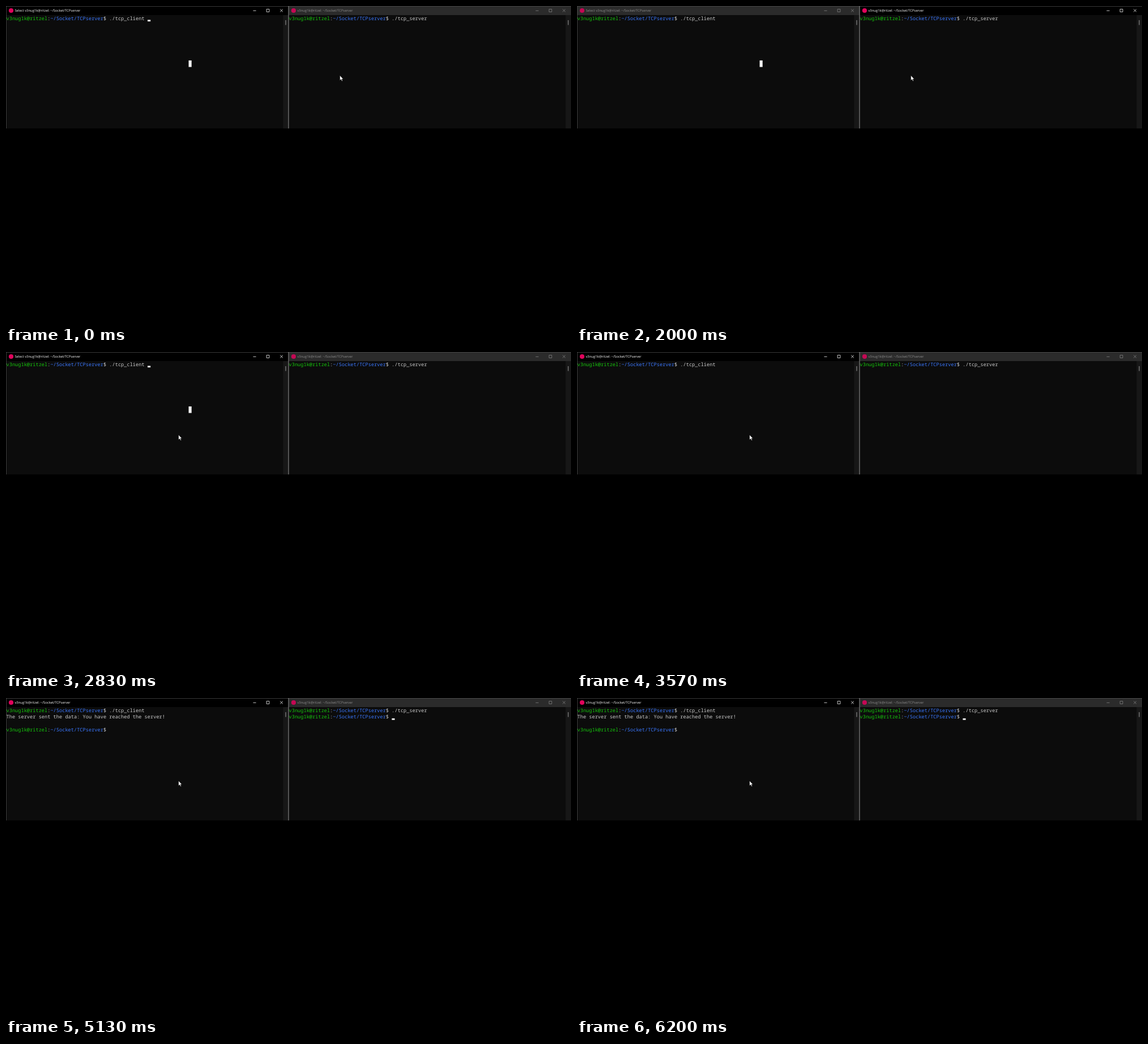
Write an HTML page that moves like this. It is 998x561 px and loops after 6460 ms.

```html
<!DOCTYPE html>
<html lang="en">
<head>
<meta charset="utf-8">
<title>TCP client and server</title>
<style>
  html, body { margin: 0; width: 100%; height: 100%; overflow: hidden; background: #000; }
  svg { display: block; }
  text { white-space: pre; text-rendering: geometricPrecision; }
  .term { font: 8.667px "Noto Sans Mono", "DejaVu Sans Mono", monospace; fill: #ccc; }
  .title { font: 5.9px "Open Sans", "Noto Sans", sans-serif; }
  .user { fill: #16c60c; }
  .path { fill: #3b78ff; }
</style>
</head>
<body>
<svg id="stage" width="998" height="561" viewBox="0 0 998 561"></svg>
<script>
const LOOP = 6460;
const COL = 5.2, ROW = 11.5;
const HOST = "v3nug1k@ritzel", DIR = "~/Socket/TCPserver";
const stage = document.getElementById("stage");

function add(parent, tag, attrs, text) {
  const el = document.createElementNS("http://www.w3.org/2000/svg", tag);
  for (const key in attrs) el.setAttribute(key, attrs[key]);
  if (text) el.textContent = text;
  parent.appendChild(el);
  return el;
}

const rect = (parent, x, y, width, height, fill) =>
  add(parent, "rect", { x, y, width, height, fill });

function line(parent, row, text) {
  return add(parent, "text", { class: "term", x: 0.5, y: 24.8 + row * ROW }, text);
}

function prompt(parent, row, command = "") {
  const el = line(parent, row);
  add(el, "tspan", { class: "user" }, HOST);
  add(el, "tspan", {}, ":");
  add(el, "tspan", { class: "path" }, DIR);
  add(el, "tspan", {}, "$ " + command);
  return el;
}

function makeWindow(x, command) {
  const g = add(stage, "g", { transform: `translate(${x} 0)` });
  rect(g, 0, 0, 499, 216, "#0c0c0c");
  rect(g, 489.5, 16, 9.5, 200, "#171717");
  rect(g, 493.6, 25, 1, 8.5, "#a0a0a0");
  const bar = rect(g, 0, 0, 499, 16, "#000");
  rect(g, 0, 0, 499, 0.8, "#484848");
  rect(g, 0, 0, 0.8, 216, "#484848");
  const icon = add(g, "circle", { cx: 9, cy: 8, r: 4.1 });
  const title = add(g, "text", { class: "title", x: 15.4, y: 10.2 });
  const buttons = add(g, "path", {
    d: "M436.5 8.3h5.2M460.2 5.6h4.8v4.8h-4.8zM484.2 5.6l4.8 4.8M489 5.6l-4.8 4.8",
    fill: "none", "stroke-width": 0.8
  });
  prompt(g, 0, command);
  const output = add(g, "g", {});
  const caret = rect(g, 0, 0, COL, 2.8, "#f2f2f2");
  return { g, bar, icon, title, buttons, output, caret };
}

const client = makeWindow(0, "./tcp_client");
const server = makeWindow(499, "./tcp_server");
rect(stage, 498.5, 0, 1, 216, "#808080");

line(client.output, 1, "The server sent the data: You have reached the server!");
prompt(client.output, 3);
prompt(server.output, 1);
const selection = rect(client.g, 322.6, 96, 5.2, 11.6, "#f2f2f2");
const pointer = add(stage, "path", {
  d: "M0 0V8.6L2 6.8L3.4 9.9L4.8 9.3L3.4 6.3H6Z",
  fill: "#fff", stroke: "#000", "stroke-width": 0.5
});

// Caret steps: [time, row, column], or only a time to hide it.
const clientCaret = [[0, 0, 48], [100], [2740, 0, 48], [3570], [4000, 0, 48],
  [4200, 3, 35], [5130], [5670, 3, 35], [6200]];
const serverCaret = [[0], [570, 0, 47], [1170], [1400, 1, 0], [2000],
  [2440, 1, 0], [2560], [4200, 1, 35]];

const clamp = v => Math.max(0, Math.min(1, v));
const ramp = (t, from, to) => clamp((t - from) / (to - from));
const smooth = v => v * v * (3 - 2 * v);
const mix = (a, b, k) => `rgb(${a.map((v, i) => Math.round(v + (b[i] - v) * k))})`;
const gray = (a, b, k) => mix([a, a, a], [b, b, b], k);
const show = (el, on) => el.setAttribute("visibility", on ? "visible" : "hidden");

function setFocus(win, k) {
  win.bar.setAttribute("fill", gray(43, 0, k));
  win.icon.setAttribute("fill", mix([196, 8, 84], [224, 4, 92], k));
  win.title.setAttribute("fill", gray(140, 250, k));
  win.buttons.setAttribute("stroke", gray(130, 245, k));
}

function setCaret(win, steps, t) {
  const [, row, col] = steps.filter(s => s[0] <= t).pop();
  show(win.caret, row !== undefined);
  if (row === undefined) return;
  win.caret.setAttribute("x", 0.5 + col * COL);
  win.caret.setAttribute("y", 24.4 + row * ROW);
}

function draw(t) {
  // Focus is lost at once and gained with a fade.
  setFocus(client, t < 30 ? 1 : ramp(t, 2470, 2740));
  setFocus(server, t < 2470 ? ramp(t, 30, 300) : 0);

  const selecting = t < 3270;
  client.title.textContent = `${selecting ? "Select " : ""}${HOST}: ${DIR}`;
  server.title.textContent = `${HOST}: ${DIR}`;
  show(selection, selecting);

  show(client.output, t >= 4200);
  show(server.output, t >= 4200);
  setCaret(client, clientCaret, t);
  setCaret(server, serverCaret, t);

  const k = smooth(ramp(t, 2000, 2330));
  pointer.setAttribute("transform", `translate(${589.8 - 285 * k} ${122.6 + 23.6 * k})`);
}

const start = performance.now();
function tick() {
  draw((performance.now() - start) % LOOP);
  requestAnimationFrame(tick);
}
tick();
</script>
</body>
</html>
```
